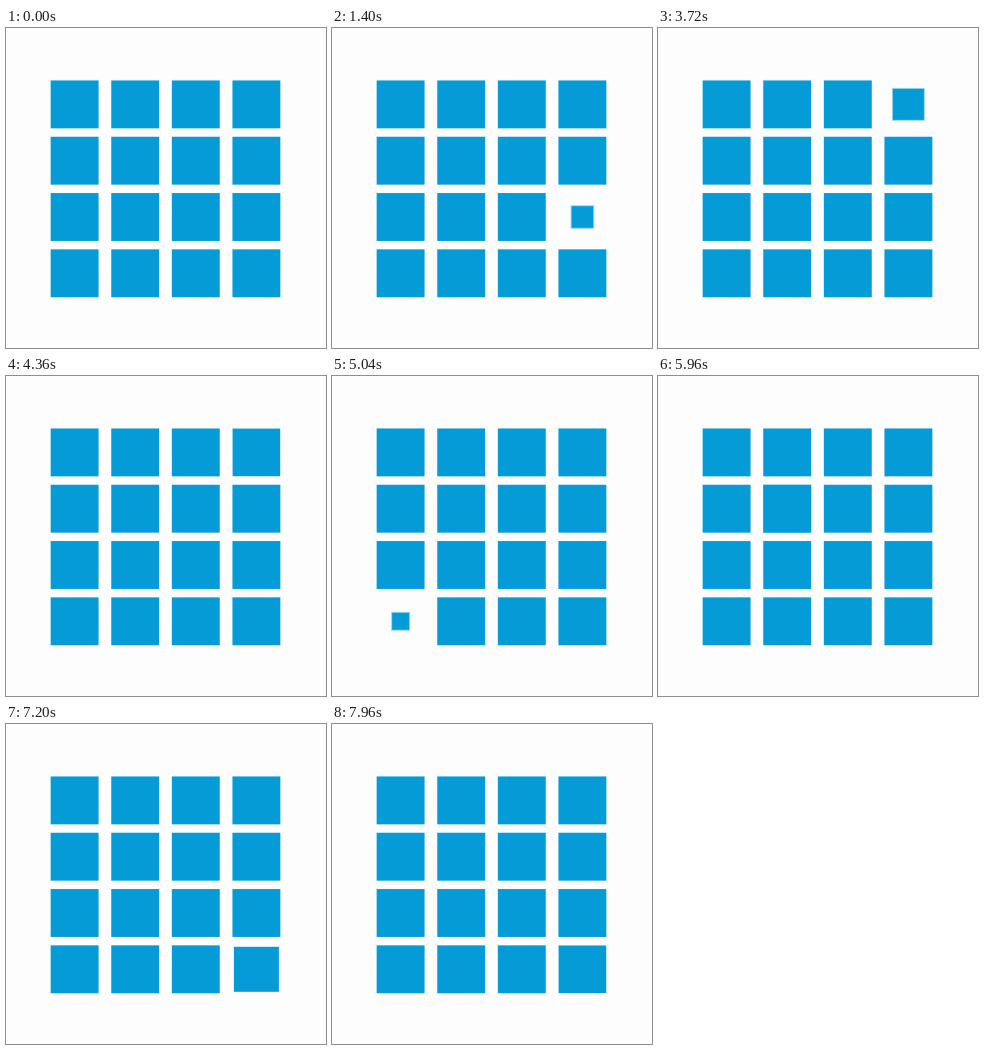
Recreate the animation shown at these times as an HTML page. Size 320 by 320 pixels, loop 8 s.

```html
<!DOCTYPE html>
<html lang="en">
<head>
<meta charset="utf-8">
<title>Pulsing squares</title>
<style>
  html, body { margin: 0; width: 100%; height: 100%; overflow: hidden; background: #fdfdfd; }
  svg { display: block; width: 100%; height: 100%; }
  rect { fill: #059bd7; stroke: #9bd5ee; stroke-width: 2; paint-order: stroke; }
</style>
</head>
<body>
<svg id="stage" viewBox="0 0 320 320"></svg>
<script>
const LOOP = 8000, STEP = 40, FIRST = 960, STAGGER = 1200;
const SIZE = 47.9;

// Cells that pulse, as [row, column], one every STAGGER ms.
const order = [[2, 3], [2, 1], [0, 3], [3, 0], [1, 1], [3, 3]];

// One pulse: a slight swell, a steady shrink, then a damped spring back.
const SWELL_END = 215, SHRINK_END = 540, SHRINK_RATE = 1 / 410;
const SPRING_PERIOD = 500, SPRING_DECAY = 95;

function scaleAt(t) {
  if (t <= 0) return 1;
  if (t < SWELL_END) return 1 + 0.02 * Math.sin(Math.PI * t / SWELL_END);
  const drop = (Math.min(t, SHRINK_END) - SWELL_END) * SHRINK_RATE;
  const u = Math.max(0, t - SHRINK_END);
  return 1 - drop * Math.exp(-u / SPRING_DECAY) * Math.cos(2 * Math.PI * u / SPRING_PERIOD);
}

const stage = document.getElementById('stage');
const cells = [];
for (let row = 0; row < 4; row++) {
  for (let col = 0; col < 4; col++) {
    const rect = document.createElementNS('http://www.w3.org/2000/svg', 'rect');
    stage.append(rect);
    const turn = order.findIndex(([r, c]) => r === row && c === col);
    cells.push({ rect, turn, cx: 68.6 + col * 60.6, cy: 76.4 + row * 56.3 });
  }
}

function place({ rect, cx, cy }, scale) {
  const size = SIZE * scale;
  rect.setAttribute('x', cx - size / 2);
  rect.setAttribute('y', cy - size / 2);
  rect.setAttribute('width', size);
  rect.setAttribute('height', size);
  rect.style.strokeOpacity = scale < 0.9 ? 1 : 0;
}

function draw() {
  const time = Math.floor(performance.now() % LOOP / STEP) * STEP;
  for (const cell of cells) {
    if (cell.turn >= 0) place(cell, scaleAt(time - FIRST - cell.turn * STAGGER));
  }
  requestAnimationFrame(draw);
}

cells.forEach(cell => place(cell, 1));
draw();
</script>
</body>
</html>
```
